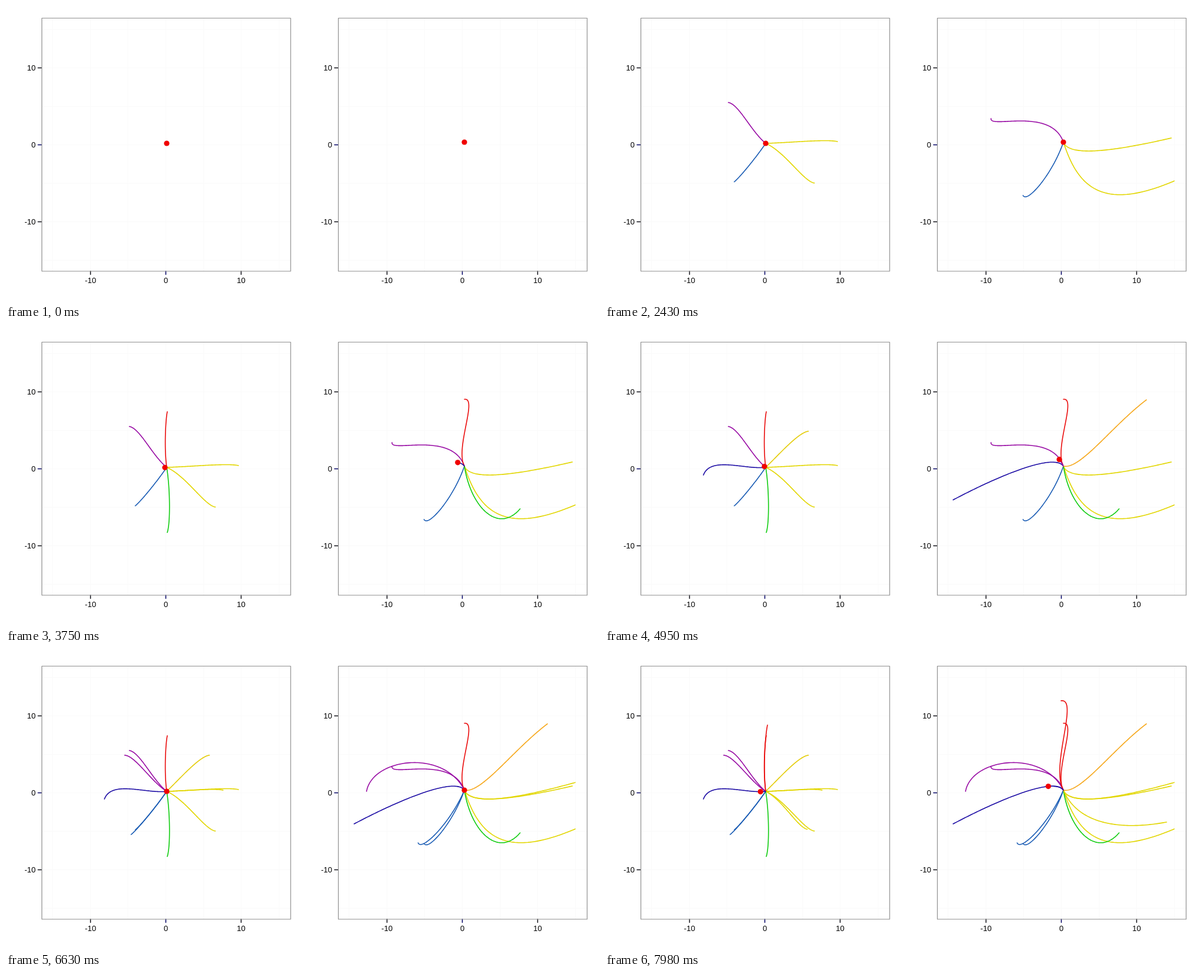
An HTML page with a canvas that plays this animation: 1000x500 px, repeating every 8 s.

```html
<!DOCTYPE html>
<html lang="en">
<head>
<meta charset="utf-8">
<title>Reach trajectories</title>
<style>
  html, body { margin: 0; width: 100%; height: 100%; overflow: hidden; background: #fff; }
  canvas { display: block; }
</style>
</head>
<body>
<canvas id="stage" width="1000" height="500"></canvas>
<script>
const ctx = document.getElementById('stage').getContext('2d');
const LOOP = 8000, STEP = 30, REACH = 600;
const UNIT_X = 12.73, UNIT_Y = 12.98, ORIGIN_Y = 234;
const LIMIT = 15;

// The hand moves a little later and faster in the left panel.
const panels = [
  { x: 60, home: [271, 232], onset: 90, duration: 400 },
  { x: 560, home: [773, 230], onset: 60, duration: 430 }
];

// A bend holds the two Bezier handles relative to the line from start to end:
// [along, aside] for the departure, then for the arrival.
const bend = (...handles) => handles;
const bow = (out, back) => bend(0.33, out, 0.85, back);
const direction = (color, left, right, colorRight = color) =>
  ({ colors: [color, colorRight], bends: [left, right] });

const east = direction('#e2d600', bow(0, -0.04), bend(0.044, 0.134, 0.42, 0.11));
const northEast = direction('#e4cc08', bow(-0.02, -0.1), bend(0.105, 0.127, 0.586, -0.01), '#f6a81c');
const north = direction('#ea0c0c', bow(-0.05, -0.03), bend(0.265, -0.142, 1.027, 0.204));
const northWest = direction('#980ca4', bow(-0.05, 0.12), bend(0.301, 0.393, 0.978, -0.14));
const west = direction('#1c0ca4', bow(0, 0.29), bend(0.046, 0.14, 0.583, 0.08));
const southWest = direction('#1a5cb4', bow(-0.03, -0.03), bend(0.471, -0.156, 1.062, -0.124));
const south = direction('#10cc10', bow(-0.05, -0.05), bend(0.433, 0.413, 0.973, 0.478));
const southEast = direction('#e2d600', bow(-0.09, 0.09), bend(0.198, 0.313, 0.438, 0.478));

// Ends are pixel offsets from the home position of each panel.
const reach = ({ colors, bends }, left, right, bendRight = bends[1]) => ({
  colors,
  curves: [makeCurve(panels[0].home, left, bends[0]), makeCurve(panels[1].home, right, bendRight)]
});

const reaches = [
  reach(southWest, [-53, 65], [-68, 90]),
  reach(southEast, [82, 67], [212, 54]),
  reach(northWest, [-63, -69], [-122, -40]),
  reach(east, [121, -3], [182, -7]),
  reach(north, [1, -94], [0, -113]),
  reach(south, [1, 110], [94, 72]),
  reach(west, [-105, 13], [-186, 57]),
  reach(northEast, [72, -61], [140, -112]),
  reach(northWest, [-71, -61], [-165, 2], bend(0.207, 0.427, 0.935, 0.34)),
  reach(east, [95, -2], [212, -20]),
  reach(southWest, [-60, 73], [-78, 89]),
  reach(southEast, [70, 64], [174, 54], bend(0.202, 0.242, 0.57, 0.225)),
  reach(north, [3, -112], [-4, -151]),
  reach(west, [-105, 13], [-186, 57])
];

function mix(a, b, k) {
  return [a[0] + (b[0] - a[0]) * k, a[1] + (b[1] - a[1]) * k];
}

function bezier(points, k) {
  if (points.length === 1) return points[0];
  return bezier(points.slice(1).map((p, i) => mix(points[i], p, k)), k);
}

function makeCurve([x, y], [dx, dy], [along1, aside1, along2, aside2]) {
  const place = (along, aside) => [x + along * dx - aside * dy, y + along * dy + aside * dx];
  const knots = [[x, y], place(along1, aside1), place(along2, aside2), place(1, 0)];
  const points = [knots[0]], lengths = [0];
  for (let i = 1; i <= 80; i++) {
    const p = bezier(knots, i / 80), last = points[i - 1];
    lengths.push(lengths[i - 1] + Math.hypot(p[0] - last[0], p[1] - last[1]));
    points.push(p);
  }
  return { points, lengths };
}

function line(x1, y1, x2, y2, color, width) {
  ctx.strokeStyle = color;
  ctx.lineWidth = width;
  ctx.beginPath();
  ctx.moveTo(x1, y1);
  ctx.lineTo(x2, y2);
  ctx.stroke();
}

function drawAxes({ x }) {
  const centerX = x + 209.5;
  for (let v = -LIMIT; v <= LIMIT; v += 5) {
    const gx = Math.floor(centerX + v * UNIT_X) + 0.5;
    const gy = Math.round(ORIGIN_Y - v * UNIT_Y) + 0.5;
    line(gx, 21, gx, 448, '#fafafa', 1);
    line(x + 1, gy, x + 420, gy, '#fafafa', 1);
    if (v % 10) continue;
    line(x - 6, gy, x, gy, v ? '#101018' : '#000064', 1.5);
    line(gx, 448, gx, 453.5, v ? '#101018' : '#000064', 1.5);
    ctx.fillStyle = '#000';
    ctx.font = '13px "Liberation Sans", Arial, sans-serif';
    ctx.textAlign = 'right';
    ctx.fillText(v, x - 10, gy + 4.5);
    ctx.textAlign = 'center';
    ctx.fillText(v, gx, 468);
  }
  ctx.strokeStyle = '#909090';
  ctx.lineWidth = 1.2;
  ctx.strokeRect(x + 0.5, 20.5, 419.5, 427.5);
}

// Draws the travelled part of a curve and returns its tip.
function drawTrail({ points, lengths }, color, progress) {
  const goal = progress * lengths[lengths.length - 1];
  let tip = points[0];
  ctx.strokeStyle = color;
  ctx.lineWidth = 1.6;
  ctx.beginPath();
  ctx.moveTo(...tip);
  for (let i = 1; i < points.length && lengths[i - 1] < goal; i++) {
    const k = Math.min(1, (goal - lengths[i - 1]) / (lengths[i] - lengths[i - 1]));
    tip = mix(points[i - 1], points[i], k);
    ctx.lineTo(...tip);
  }
  if (progress > 0) ctx.stroke();
  return tip;
}

function minimumJerk(u) {
  const k = Math.max(0, Math.min(1, u));
  return k * k * k * (10 - 15 * k + 6 * k * k);
}

function drawReaches(panel, index, time) {
  const current = Math.floor(time / REACH);
  const edge = panel.x + 209.5 + LIMIT * UNIT_X;
  let tip;
  ctx.save();
  ctx.beginPath();
  ctx.rect(panel.x, 20, edge - panel.x, 428);
  ctx.clip();
  for (let i = 0; i <= current; i++) {
    const u = (time - i * REACH - panel.onset) / panel.duration;
    tip = drawTrail(reaches[i].curves[index], reaches[i].colors[index], minimumJerk(u));
  }
  ctx.restore();
  // Positions beyond the axis limit are not plotted.
  if (tip[0] > edge) return;
  ctx.fillStyle = '#f00000';
  ctx.beginPath();
  ctx.arc(tip[0], tip[1], 4.6, 0, Math.PI * 2);
  ctx.fill();
}

function draw(now) {
  const time = Math.floor((now % LOOP) / STEP) * STEP;
  ctx.fillStyle = '#fff';
  ctx.fillRect(0, 0, 1000, 500);
  ctx.lineCap = ctx.lineJoin = 'round';
  panels.forEach((panel, index) => {
    drawAxes(panel);
    drawReaches(panel, index, time);
  });
}

const start = performance.now();
function tick() {
  draw(performance.now() - start);
  requestAnimationFrame(tick);
}
tick();
</script>
</body>
</html>
```
